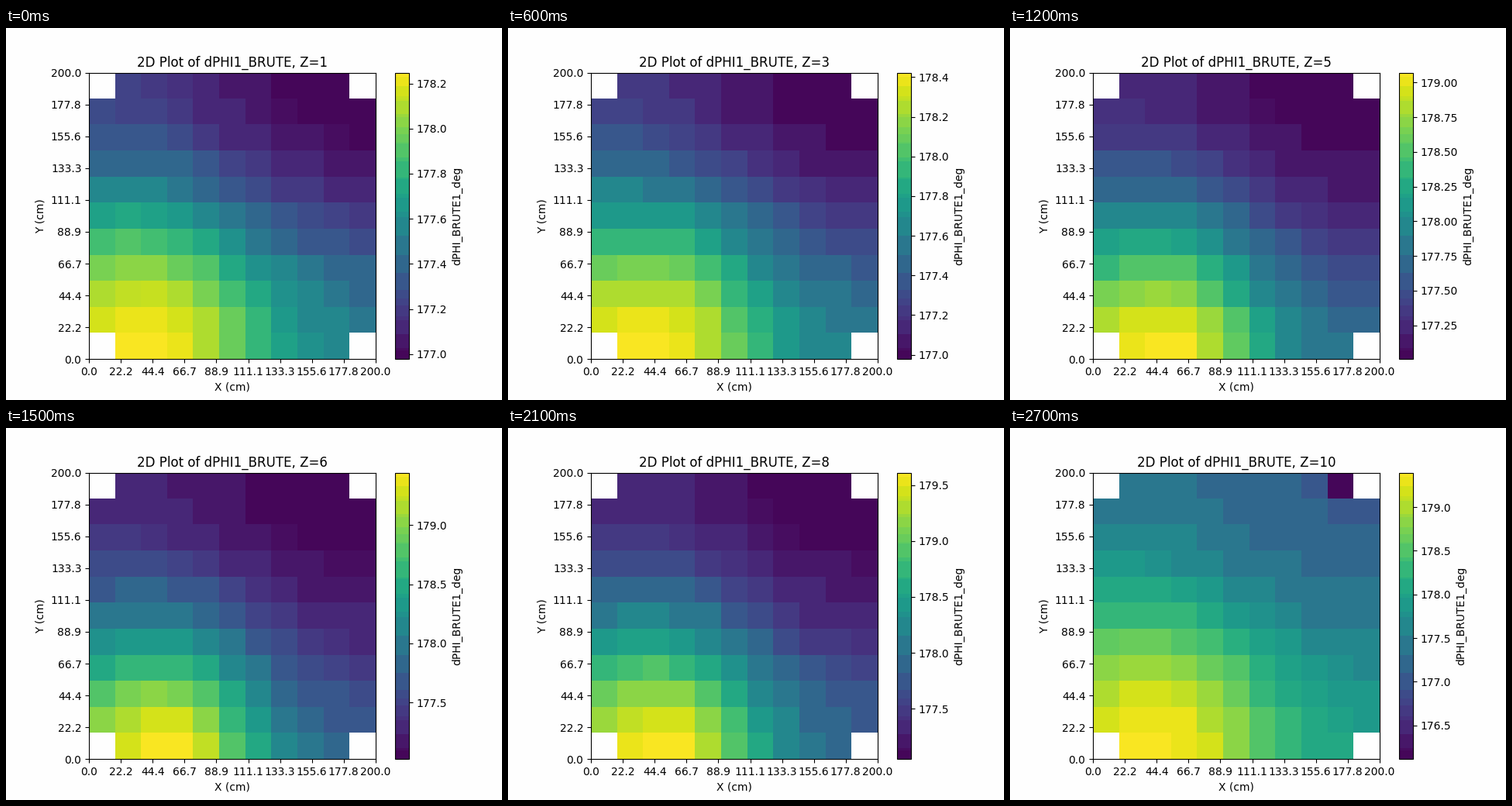
A matplotlib script for the animation above (3000 ms loop, 640 by 480 pixels).

```python
import numpy as np
import matplotlib.pyplot as plt
from matplotlib.animation import FuncAnimation
from matplotlib.colors import ListedColormap

LAYERS = 10
CELLS = 11
SIDE = 200
PAPER = "#fefefe"
DIP = 176.115  # single low cell of the top layer

# Value range at a few layers; the layers between are interpolated.
KEY_LAYERS = [1, 3, 5, 7, 8, 9, 10]
LOWS = [176.978, 176.978, 177.006, 177.036, 177.049, 177.052, 177.070]
HIGHS = [178.248, 178.423, 179.071, 179.815, 179.612, 179.438, 179.394]


def banded_viridis():
    """Viridis reduced to flat bands: 3 bits red, 4 bits green, 3 bits blue."""
    rgb = np.round(plt.get_cmap("viridis")(np.arange(256))[:, :3] * 255)
    _, group = np.unique(rgb // [32, 16, 32], axis=0, return_inverse=True)
    group = group.ravel()
    means = [rgb[group == g].mean(axis=0) for g in range(group.max() + 1)]
    return ListedColormap(np.floor(means)[group] / 255)


def fall(u):
    """Cosine ease from 1 at u=0 down to 0 at u=1."""
    return (1 + np.cos(np.pi * u)) / 2


def relative_field(focus):
    """Hot spot near the bottom edge; a higher focus makes it narrower."""
    x, y = np.meshgrid(np.linspace(0, 1, CELLS), np.linspace(0, 1, CELLS))
    centre = .20 + .07 * focus
    width = (.45 - .11 * focus) * np.where(x < centre, 1.7, 1)
    floor = .40 - .10 * focus
    bottom = floor + (1 - floor) * np.exp(-((x - centre) / width) ** 2)
    top = (.20 - .10 * focus) * fall(x) ** 1.4
    bend = 1 - .22 * focus - .14 * x
    return top + (bottom - top) * fall(y ** bend)


def layer_field(layer):
    low = np.interp(layer, KEY_LAYERS, LOWS)
    high = np.interp(layer, KEY_LAYERS, HIGHS)
    focus = np.exp(-((layer - 6.7) / 2.75) ** 2)
    field = low + (high - low) * relative_field(focus)
    if layer == LAYERS:
        field[-1, -2] = low = DIP
    field[np.ix_([0, -1], [0, -1])] = np.nan
    return field, low, high


CMAP = banded_viridis()
fig = plt.figure(figsize=(6.4, 4.8), dpi=100, facecolor=PAPER)


def draw(index):
    layer = index + 1
    fig.clear()
    ax = fig.add_subplot(facecolor=PAPER)
    field, low, high = layer_field(layer)
    image = ax.imshow(field, cmap=CMAP, vmin=low, vmax=high, origin="lower",
                      extent=(0, SIDE, 0, SIDE), interpolation="nearest")
    fig.colorbar(image, ax=ax, label="dPHI_BRUTE1_deg")
    ticks = np.linspace(0, SIDE, 10)
    labels = [f"{t:.1f}" for t in ticks]
    ax.set_xticks(ticks, labels)
    ax.set_yticks(ticks, labels)
    ax.set_xlabel("X (cm)")
    ax.set_ylabel("Y (cm)")
    ax.set_title(f"2D Plot of dPHI1_BRUTE, Z={layer}")
    return []


anim = FuncAnimation(fig, draw, frames=LAYERS, interval=300,
                     repeat=True, repeat_delay=0)
plt.show()
```
